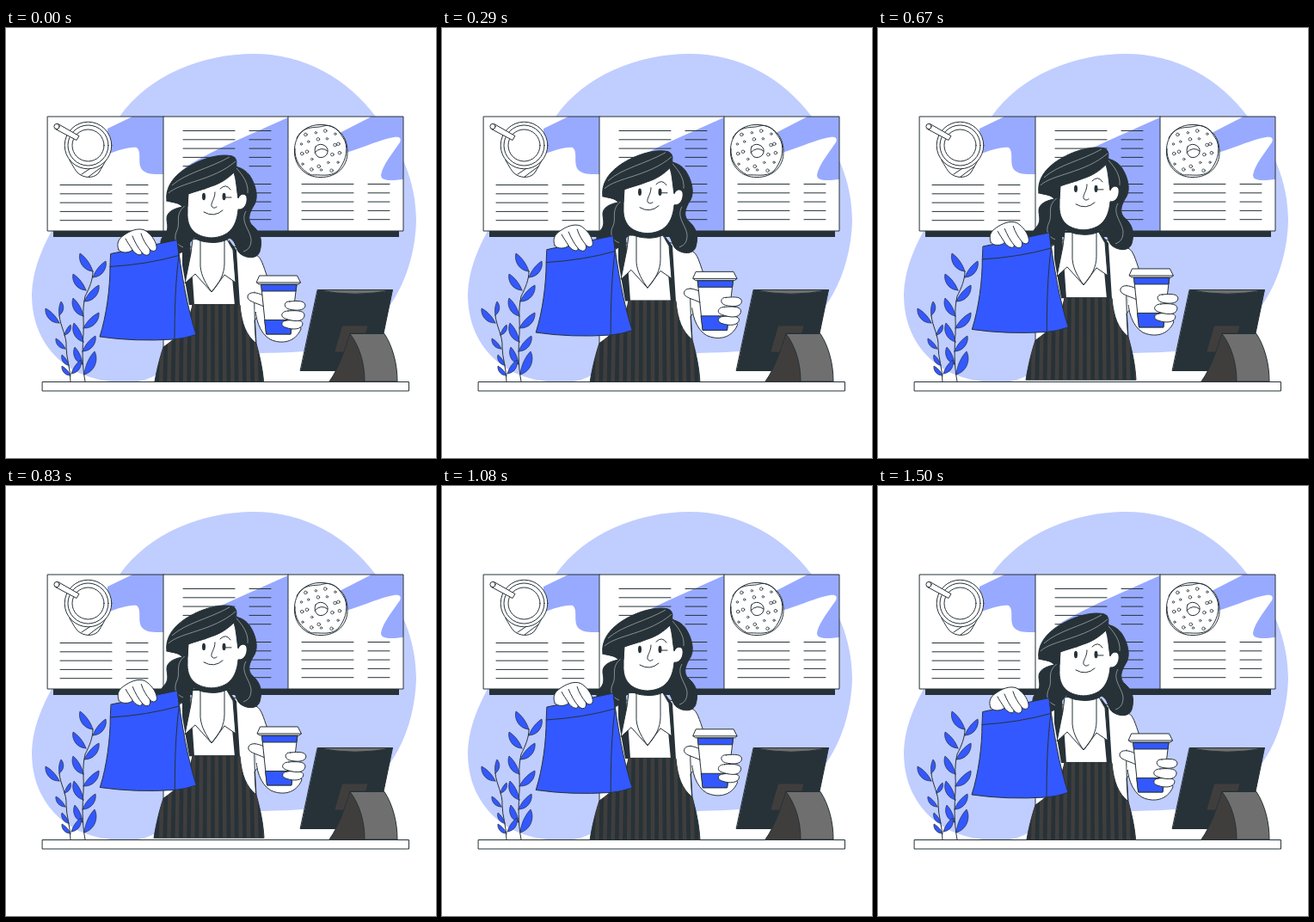
These frames come from a looping animation (500x500 px, 1540 ms). An HTML page:

```html
<!DOCTYPE html>
<html lang="en">
<head>
<meta charset="utf-8">
<title>At the counter</title>
<style>
html, body { margin: 0; width: 100%; height: 100%; overflow: hidden; background: #fff; }
svg { display: block; width: 100vw; height: 100vh; }
.s { stroke: #263238; stroke-width: 1; stroke-linejoin: round; stroke-linecap: round; }
.w { fill: #fff; }
.d { fill: #263238; }
.n { fill: none; }
.b { fill: #3358ff; }
.m { fill: #98aaff; }
.g { fill: #403e3d; }
.h { fill: none; stroke: #c9ced1; stroke-width: .6; }
</style>
</head>
<body>
<svg viewBox="0 0 500 500">
  <defs>
    <clipPath id="skirt"><path d="M217 321.500H266L272 322C274 344 279 357 291 367C296 385 299 400 300 417H172C175 398 179 383 183 371C198 361 212 347 217 321.500Z"/></clipPath>
  </defs>

  <path fill="#c0cdff" d="M132 103C166 55 228 30 288 30C347 30 397 59 430 103C459 138 477 178 477 225C475 286 446 340 402 363C374 377 335 377 298 378C248 381 215 386 177 402C166 409 153 412 140 412C110 412 78 404 56 380C37 359 30 335 30 309C31 284 39 262 53 236C82 200 101 151 132 103Z"/>

  <path class="d" d="M55 236H457V243H55Z"/>
  <path class="w" d="M49 103H462V236H49Z"/>
  <path class="m" d="M183 103H147L118 117V147C131 142 143 138 152 139C158 144 153 155 157 163C162 171 173 170 183 170Z"/>
  <path class="m" d="M328 104L290 121C260 134 231 148 206 163C222 158 248 149 268 161C279 164 284 169 283 177C276 184 280 205 285 236H328Z"/>
  <path class="m" d="M462 103H425L390 121L371 149C399 148 425 132 451 127C458 126 460 128 458 133C450 145 438 159 436 171C436 179 450 177 462 176Z"/>
  <path class="s n" d="M48.500 103H462V236H48.500ZM183 103V236M328 103V236"/>
  <path id="menu" class="s n"/>

  <g class="s w">
    <path d="M74 154C78 160 81 168 87 171C94 175 104 174 108 168C111 163 113 160 116 154Z"/>
    <path d="M88 170L103 160M96 173L112 161"/>
    <circle cx="95.500" cy="136.500" r="27.300"/>
    <circle cx="95.500" cy="136.500" r="23.500"/>
    <circle cx="95.500" cy="136.500" r="18.500"/>
    <path d="M60.500 111.500L85 125.500L82 130.500L57.500 117.500Z"/>
    <circle cx="59" cy="114.500" r="3.100"/>
    <path d="M366 112.500C384 112 397 125 397 143C398 161 384 174 366 173.500C348 174 335 160 335.500 143C335 125 348 112 366 112.500Z"/>
    <path d="M338 128C346 112 361 117 369 114C382 111 388 121 394 131C399 144 393 158 386 166C377 174 365 170 355 171C343 165 335 154 336 140" fill="none"/>
    <path d="M360 138Q365 133 371 137Q376 141 373 147Q369 152 363 150Q357 145 360 138Z"/>
    <path d="M359 145Q366 137 374 143" fill="none"/>
  </g>
  <g id="dots" class="s w"></g>

  <g id="plants"></g>

  <g class="s">
    <path class="d" d="M362.500 304.500H449.500L430 398.500H342.500Z"/>
    <path fill="#6f6f6f" d="M362.500 304.500H449.500Q406 314 362.500 304.500Z"/>
    <path class="g" d="M391 346H421L413 377H382Z"/>
    <path class="g" d="M376 411C388 394 394 374 400 355H430L426 411Z"/>
    <path fill="#6f6f6f" d="M400 355.500H440C450 371 455 391 455 411H417C417 389 411 370 400 355.500Z"/>
  </g>

  <g id="body">
    <path class="s w" d="M199 264C209 256 220 251 240 250C263 252 280 258 291 264C297 267 299 276 304 290L297 330L289 340L291 375H183V360Z"/>
    <path class="d" d="M205 250L214 248L219 322H213L205 276ZM259 246L268 258L272 323H266Z"/>
    <path class="s d" d="M217 321.500H266L272 322C274 344 279 357 291 367C296 385 299 400 300 417H172C175 398 179 383 183 371C198 361 212 347 217 321.500Z"/>
    <g id="stripes" class="g" clip-path="url(#skirt)"></g>
    <path class="s n" d="M289 307C288 327 290 347 291 367"/>
  </g>

  <g id="head">
    <path class="s d" d="M213 176L188 200C194 203 201 203 205 208C195 210 186 214 187 223C188 231 189 235 184 241C177 247 179 258 190 260C199 263 209 263 213 251L218 244H260C269 249 266 258 273 263C280 268 292 269 295 260C299 246 295 237 287 230C279 223 284 213 289 205C294 196 290 181 283 171C277 163 266 158 257 165Z"/>
    <path class="h" d="M208 207C196 216 203 226 199 235C194 245 198 252 206 255M279 213C272 225 284 235 285 246C285 254 282 258 276 260"/>
  </g>

  <g id="neck" class="s">
    <path class="w" d="M217 246L215 262L208 297L220 286L239 307L254 287L267 296L264 258L257 246Z"/>
    <path class="n" d="M226 246V277C227 289 233 298 239 307C248 297 254 286 254 274V246"/>
  </g>

  <g id="face">
    <path class="s d" d="M211 228C213 244 223 249 241 249.500C258 249 267 242 270 225Z"/>
    <path class="s w" d="M211 180V214C210 233 220 243 239 244C258 243 268 233 270 211C277 212 281 204 280 197C279 192 273 192 270 197L268 160Z"/>
    <path class="s d" d="M187 201C185 187 193 175 205 166C221 154 247 145 263 149C268 151 269 156 267 161C281 165 287 181 282 195C278 190 273 191 270 198C268 187 268 177 265 168C258 175 249 181 239 184C229 188 220 190 212 193L211 208L205 206C202 203 193 203 187 201Z"/>
    <path class="h" d="M189 192C203 179 240 178 267 155M193 183C210 168 235 164 260 150M268 163C276 172 282 181 281 192"/>
    <ellipse class="d" cx="230" cy="196" rx="2" ry="4.200"/>
    <ellipse class="d" cx="253.500" cy="196" rx="2" ry="4.200"/>
    <path class="s n" d="M221 188Q226 184 231 187M249 187Q256 180 261 188M243 191C243 199 238 203 239 207Q241 211 245 208M230 214Q242 221 252 212M254 197L262 197"/>
  </g>

  <g id="bag" class="s">
    <path class="b" d="M122 262.500L199 246.500C204 286 211 326 221 356.500Q208 361 196 362Q150 365 109 359C117 334 121 302 121 277.500Z"/>
    <path class="n" d="M121 277.500Q164 275 201 264.500C197 294 196 330 196 362M199 246.500L201 264.500"/>
    <path class="w" d="M131 258C128 250 131 245 137 241C144 236 153 232 161 235C168 239 174 247 175 254C176 260 170 261 167 257C169 264 163 267 158 261C158 266 151 264 147 258C143 262 134 262 131 258Z"/>
    <path class="n" d="M147 258C144 253 141 249 139 245M158 261C153 255 150 249 147 242M167 257C163 252 159 246 157 239"/>
  </g>

  <g id="cup" class="s">
    <path class="w" d="M290 320C289 337 295 355 307 362C320 368 336 366 343 350L338 330L298 310Z"/>
    <path class="w" d="M289.500 308H300V330H289.500Z" style="stroke:none"/>
    <path class="w" d="M299 311C292 307 282 306 281 312C280 318 290 319 300 324Z"/>
    <path class="w" d="M297 298H338L331 356H303Z"/>
    <path class="b" d="M297 298.500H338L337 306H298ZM301 339.500H333L331 356H303Z"/>
    <path class="w" d="M295 288H338.500L342.500 296L340 298H294L291.500 296Z"/>
    <path class="n" d="M291.500 296H342.500"/>
    <path class="w" d="M326 340C319 341 319 347 326 348.500C333 351 344 351 345 344C345 340 338 339 326 340Z"/>
    <path class="w" d="M328 329C320 329 318 336 325 338C333 341 345 343 347 335C348 329 340 328 328 329Z"/>
    <path class="w" d="M330 318C323 317 322 325 329 327C337 329 347 329 348 323C348 317 340 317 330 318Z"/>
  </g>

  <path class="s w" d="M42.500 411.500H468.500V422H42.500Z"/>
</svg>
<script>
const $ = id => document.getElementById(id);

const rows = (x, w, y, n) =>
  Array.from({ length: n }, (_, i) => `M${x} ${y + i * 10.3}h${w}`).join("");
$("menu").setAttribute("d",
  rows(63, 60, 182.5, 5) + rows(140, 25, 182.5, 5) +
  rows(206, 60, 119.5, 5) + rows(283, 25, 119.5, 5) + rows(283, 25, 181.5, 5) +
  rows(344, 60, 181.5, 5) + rows(421, 25, 181.5, 5));

// Sprinkles on two rings around the hole.
const ring = (n, r, turn) => Array.from({ length: n }, (_, i) => {
  const a = turn + i * 2 * Math.PI / n;
  const d = r + (i % 3 - 1) * 2;
  return `<circle cx="${366 + d * Math.cos(a)}" cy="${143 + d * Math.sin(a)}" r="${i % 2 ? 1.2 : 1.8}" stroke-width=".8"/>`;
}).join("");
$("dots").innerHTML = ring(9, 16, .3) + ring(13, 24, .1);

$("stripes").innerHTML = Array.from({ length: 14 }, (_, i) => {
  const x = 179 + i * 9.1;
  const lean = (x - 238) * .02;
  return `<path d="M${x - lean} 320h4.500L${x + lean + 4.5} 420h-4.500Z"/>`;
}).join("");

// A slim leaf from its foot on the stem to its tip, fuller on the outer side.
function leaf([x, y, tx, ty]) {
  const dx = tx - x, dy = ty - y;
  const side = dx < 0 ? -1 : 1;
  const at = (u, v) => `${x + dx * u - dy * v * side} ${y + dy * u + dx * v * side}`;
  return `<path class="s b" d="M${x} ${y}C${at(.3, .36)} ${at(.8, .26)} ${tx} ${ty}C${at(.8, -.08)} ${at(.4, -.14)} ${x} ${y}Z" style="stroke-width:.7"/>`;
}
const stem = d => `<path class="s n" d="${d}"/>`;
const leaves = [
  [101, 283, 86, 262], [101, 290, 116, 271], [93, 305, 78, 286], [91, 318, 108, 299],
  [90, 335, 78, 314], [90, 349, 108, 331], [90, 365, 79, 343], [89, 376, 104, 358],
  [89, 391, 80, 371], [91, 403, 103, 376],
  [62, 334, 64, 318], [62, 343, 46, 326], [68, 357, 75, 345],
  [69, 373, 58, 361], [73, 392, 65, 380], [75, 404, 65, 393], [76, 402, 87, 386]
];
$("plants").innerHTML =
  stem("M92 411C88 390 89 371 90 355C91 339 88 330 92 312C97 302 101 293 101 283") +
  stem("M75 411C75 396 70 383 70 371C71 358 63 347 62 334") +
  leaves.map(leaf).join("");

const LOOP = 1540, TOP = 760;
// Quick rise that settles, then a soft fall.
const lift = t => t < TOP
  ? Math.sin(t / TOP * Math.PI / 2)
  : (1 + Math.cos((t - TOP) / (LOOP - TOP) * Math.PI)) / 2;

const parts = { body: [0, 8], head: [0, 9.3], neck: [0, 8.3], face: [0, 9.3], bag: [.3, 8.7], cup: [.9, 8.2] };

function draw(now) {
  const u = lift(now % LOOP);
  for (const [id, [x, y]] of Object.entries(parts))
    $(id).setAttribute("transform", `translate(${x * u} ${-y * u})`);
}

const start = performance.now();
function tick() {
  draw(performance.now() - start);
  requestAnimationFrame(tick);
}
tick();
</script>
</body>
</html>
```
